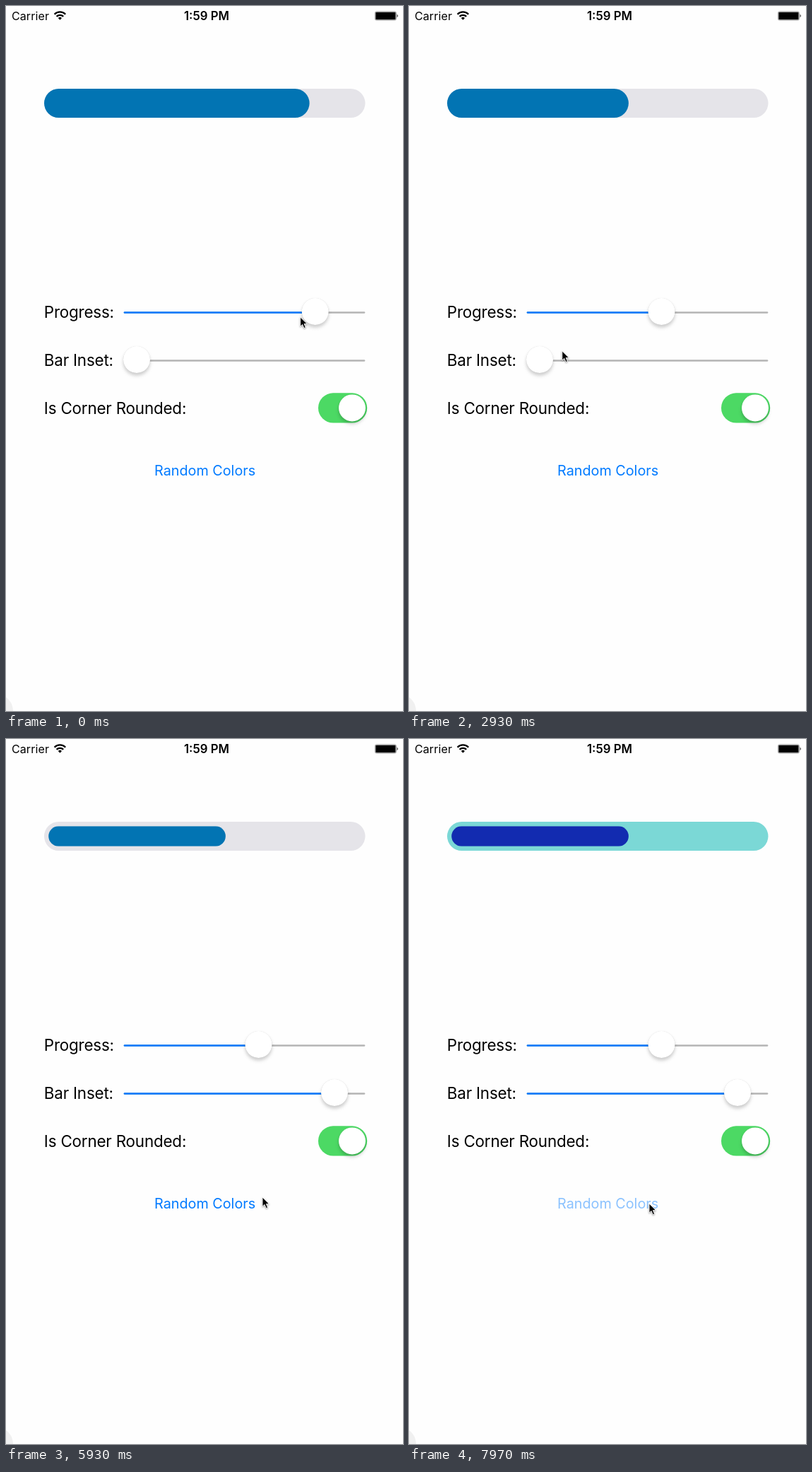
These frames come from a looping animation (562x997 px, 8 s). An HTML page:

```html
<!DOCTYPE html>
<html lang="en">
<head>
<meta charset="utf-8">
<title>Progress bar demo</title>
<style>
  html, body { margin: 0; width: 100%; height: 100%; overflow: hidden; background: #fefefe; }
  svg { display: block; width: 100%; height: 100%; }
  text { font-family: Inter, Roboto, sans-serif; }
  .label { font-size: 22.4px; letter-spacing: -.18px; }
  .knob { fill: #fff; filter: drop-shadow(0 0 .5px #0003) drop-shadow(0 4px 2.5px #00000026) drop-shadow(0 2px 2px #00000010); }
  .line { stroke-width: 2.7; stroke-linecap: round; }
</style>
</head>
<body>
<svg viewBox="0 0 562 997">
  <defs>
    <clipPath id="clip"><rect id="inside"/></clipPath>
    <g id="rail"><path class="line" d="M168 433.5H507" stroke="#b4b4b4"/></g>
  </defs>
  <circle cx="-14" cy="997" r="24" fill="#f0f0f0"/>

  <!-- status bar -->
  <text x="8" y="20" font-size="16" letter-spacing=".1">Carrier</text>
  <g fill="none" stroke="#000" stroke-width="2.3">
    <path d="M68.6 11.8a10.8 10.8 0 0 1 15.6 0M71.6 14.9a6.7 6.7 0 0 1 9.6 0"/>
    <path d="M76.4 19.7l-2.6-2.7a3.7 3.7 0 0 1 5.2 0z" fill="#000" stroke="none"/>
  </g>
  <text x="284" y="20" font-size="16.8" font-weight="600" text-anchor="middle">1:59 PM</text>
  <rect x="522.4" y="7.9" width="30" height="12.2" rx="2" fill="none" stroke="#888" stroke-width=".8"/>
  <rect x="523.3" y="8.8" width="28.2" height="10.4" rx="1"/>
  <path d="M553.6 11.6q2.2 2.4 0 4.8z"/>

  <!-- progress bar -->
  <rect id="track" x="54" y="117" width="454.5" height="41"/>
  <g clip-path="url(#clip)"><rect id="fill"/></g>

  <text class="label" x="53.8" y="441">Progress:</text>
  <text class="label" x="53.8" y="509">Bar Inset:</text>
  <text class="label" x="53.8" y="577">Is Corner Rounded:</text>

  <g class="slider">
    <use href="#rail"/>
    <path class="line" stroke="#007aff"/>
    <circle class="knob" cy="432" r="19"/>
  </g>
  <g class="slider" transform="translate(0 68)">
    <use href="#rail"/>
    <path class="line" stroke="#007aff"/>
    <circle class="knob" cy="432" r="19"/>
  </g>

  <rect id="toggle" x="442" y="547.3" width="69.2" height="42.2" rx="21.1"/>
  <rect id="hollow" x="444" y="549.3" width="65.2" height="38.2" rx="19.1" fill="#fff"/>
  <rect id="thumb" class="knob" y="549.4" height="38" rx="19"/>

  <text id="button" x="281.6" y="664" font-size="19.8" text-anchor="middle" fill="#007aff">Random Colors</text>

  <path id="cursor" d="M0 0V13.2L3 10.4 5.3 15.6 7.6 14.6 5.4 9.6H9.6Z" stroke="#fff" stroke-width=".9"
        style="filter: drop-shadow(0 1px 1px #0006)"/>
</svg>
<script>
const LOOP = 8000;
const LAG = 120;                         // knobs trail the pointer by this much
const GRAB = 12;                         // pointer tip to knob centre
const SLIDER_MIN = 184, SLIDER_SPAN = 307;
const BAR = { x: 54, y: 117, w: 454.5, h: 41 };
const BAR_COLORS = ['#e5e4e9', '#0274b3'];
const TAP_COLORS = [['#8fce62', '#b5483c'], ['#eea042', '#a15c98'], ['#d98bc0', '#3c8a55'], ['#7bd8d6', '#122bb0']];

// Pointer moves: start, end, destination. It rests in between.
const MOVES = [
  [-LAG, 1160, 209, 440],                // drag progress down
  [1300, 1640, 205, 500],
  [1900, 2150, 209, 438],
  [2190, 2358, 369.5, 426],              // drag progress up
  [2740, 2990, 197, 496],
  [3030, 3840, 477, 488],                // drag inset
  [3900, 4330, 497, 581],                // to the toggle
  [4810, 5120, 463, 574],
  [5690, 5925, 363, 648],                // to the button
  [6200, 6470, 340, 657]
];

const $ = id => document.getElementById(id);
const sliders = document.querySelectorAll('.slider');
const clamp = (v, lo, hi) => Math.min(hi, Math.max(lo, v));
const ramp = (t, a, b) => clamp((t - a) / (b - a), 0, 1);
const ease = u => 1 - (1 - u) ** 1.5;
const lerp = (a, b, u) => a + (b - a) * u;
const set = (el, attrs) => Object.entries(attrs).forEach(([k, v]) => el.setAttribute(k, v));

function pointer(t) {
  let x = 450, y = 440;
  for (const [a, b, toX, toY] of MOVES) {
    const u = ease(ramp(t, a, b));
    x = lerp(x, toX, u);
    y = lerp(y, toY, u);
  }
  return [x, y];
}

const knobX = time => pointer(time)[0] - GRAB;
const valueOf = x => (x - SLIDER_MIN) / SLIDER_SPAN;

function drawSlider(el, x) {
  const [, line, knob] = el.children;
  set(line, { d: `M168 433.5H${x}` , visibility: x > 186 ? 'visible' : 'hidden' });
  set(knob, { cx: x });
}

function drawBar(progress, inset, rounded, [back, front]) {
  const width = BAR.w - 2 * inset, height = BAR.h - 2 * inset;
  const box = { y: BAR.y + inset, width, height, rx: rounded ? height / 2 : 0 };
  set($('track'), { rx: rounded ? BAR.h / 2 : 0, fill: back });
  set($('inside'), { ...box, x: BAR.x + inset });
  set($('fill'), { ...box, x: BAR.x + BAR.w * progress - width, fill: front });
}

function drawToggle(t) {
  const off = ease(ramp(t, 4670, 5000)) - ease(ramp(t, 5690, 5930));
  const press = Math.sin(Math.PI * ramp(t, 4620, 5120)) + Math.sin(Math.PI * ramp(t, 5630, 5930));
  const stretch = 9 * press;
  const mix = channel => Math.round(lerp(channel, 229, off));
  set($('toggle'), { fill: `rgb(${mix(76)},${mix(217)},${mix(100)})` });
  set($('hollow'), { transform: `translate(476.6 568.4) scale(${off}) translate(-476.6 -568.4)` });
  set($('thumb'), { x: lerp(471 - stretch, 444, off), width: 38 + stretch });
}

function drawButton(t) {
  let colors = BAR_COLORS, opacity = 1;
  TAP_COLORS.forEach((pair, i) => {
    const press = 6600 + 355 * i, release = press + 150;
    if (t >= press) opacity = t < release + 60 ? .2 : .45;
    if (t >= release) colors = pair;
  });
  set($('button'), { opacity });
  return colors;
}

function draw(t) {
  const late = t - LAG;
  const progressX = knobX(late < 2190 ? Math.min(late, 1290) : Math.min(late, 2700));
  const insetX = knobX(clamp(late, 3030, 3900));
  drawSlider(sliders[0], progressX);
  drawSlider(sliders[1], insetX);
  const rounded = t < 4670 || t >= 5690;
  drawBar(valueOf(progressX), 6.8 * valueOf(insetX), rounded, drawButton(t));
  drawToggle(t);
  set($('cursor'), { transform: `translate(${pointer(t)})` });
}

const start = performance.now();
function tick() {
  draw((performance.now() - start) % LOOP);
  requestAnimationFrame(tick);
}
tick();
</script>
</body>
</html>
```
